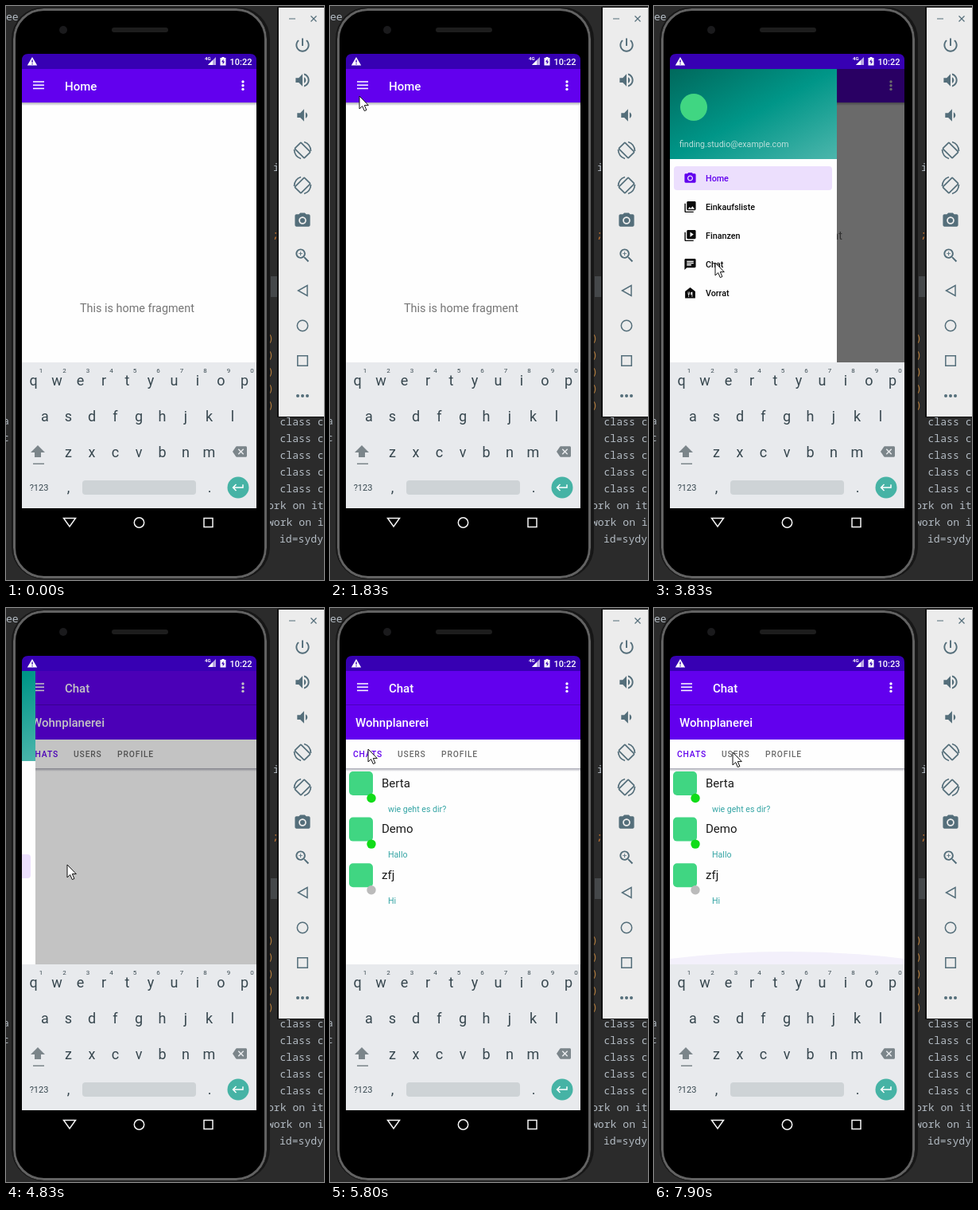
Write an HTML page that moves like this. It is 400x720 px and loops after 8000 ms.

```html
<!DOCTYPE html>
<html lang="de">
<head>
<meta charset="utf-8">
<title>Phone emulator</title>
<style>
html, body { margin: 0; width: 100%; height: 100%; overflow: hidden; background: #2b2b2b; }
svg { display: block; width: 400px; height: 720px; }
text { font-family: Roboto, sans-serif; white-space: pre; }
.code text { font: 13.1px "Noto Sans Mono", monospace; fill: #b4bcc4; }
.keys { text-anchor: middle; fill: #37474f; font-size: 18px; }
.med text, .med { font-weight: 500; }
</style>
</head>
<body>
<svg id="stage" viewBox="0 0 400 720">
  <defs>
    <linearGradient id="head" x1="0" y1="0" x2="1" y2="1">
      <stop offset="0" stop-color="#00695c"/><stop offset=".5" stop-color="#009688"/><stop offset="1" stop-color="#4db6ac"/>
    </linearGradient>
    <linearGradient id="shade" x2="0" y2="1">
      <stop offset="0" stop-color="#55556c" stop-opacity=".5"/><stop offset="1" stop-color="#55556c" stop-opacity="0"/>
    </linearGradient>
    <clipPath id="view"><path d="M20 79h295v368H20z"/></clipPath>
  </defs>

  <rect width="400" height="720" fill="#2b2b2b"/>
  <g class="code" id="code"></g>

  <!-- phone body -->
  <rect x="7" y="1.500" width="325" height="717" rx="40" fill="#161616"/>
  <rect x="10.500" y="4.500" width="316" height="712" rx="37" fill="#000" stroke="#626262" stroke-width="3"/>
  <rect x="8.500" y="2.500" width="320" height="716" rx="39" fill="none" stroke="#1c1c1c"/>
  <circle cx="72" cy="30" r="5" fill="#1a1a1c"/>
  <rect x="133" y="27" width="71" height="6" rx="3" fill="#1d1d1d"/>

  <!-- screen -->
  <rect x="20" y="79" width="295" height="551" fill="#fefefe"/>
  <path d="M20 79V68q0-8 8-8h279q8 0 8 8v11z" fill="#3700b3"/>
  <g fill="#fff">
    <path fill-rule="evenodd" d="M33 64l6.200 10.500H26.800zM32.400 67.500v3.500h1.300v-3.500zM32.400 72v1.300h1.300V72z"/>
    <text x="250" y="68" font-size="6" font-weight="700">4G</text>
    <path d="M264 64v10h-10z" opacity=".65"/>
    <path d="M260 68v6h-6z"/>
    <path fill-rule="evenodd" d="M271.500 64h3v1h2v9.500h-7V65h2zM273.500 66.500l-2.500 3.800h1.700v3l2.500-3.900h-1.700z"/>
    <text class="med" id="clock" x="281.500" y="73.500" font-size="11"></text>
  </g>

  <g clip-path="url(#view)">
    <rect x="20" y="79" width="295" height="42" fill="#6200ee"/>
    <path d="M34 95h14M34 99.300h14M34 103.600h14" stroke="#fff" stroke-width="1.500"/>
    <g fill="#fff"><circle cx="298" cy="95" r="1.700"/><circle cx="298" cy="99.700" r="1.700"/><circle cx="298" cy="104.400" r="1.700"/></g>
    <text class="med" id="title" x="74" y="105.500" font-size="15" fill="#fff"></text>

    <g id="home">
      <rect x="20" y="121" width="295" height="4" fill="url(#shade)"/>
      <text id="note" x="93" font-size="14.400" fill="#757575">This is home fragment</text>
    </g>

    <g id="chat">
      <rect x="20" y="121" width="295" height="44" fill="#6200ee"/>
      <path d="M20 121.500h295" stroke="#4c00bd"/>
      <rect x="20" y="201" width="295" height="4" fill="url(#shade)"/>
      <g class="med">
        <text x="32" y="149" font-size="15" fill="#fff">Wohnplanerei</text>
        <g font-size="10.300" letter-spacing=".85" fill="#6b6b6b">
          <text x="29" y="187" fill="#6200ee">CHATS</text>
          <text x="85" y="187">USERS</text>
          <text x="140" y="187">PROFILE</text>
        </g>
      </g>
      <g id="list"></g>
      <path id="glow" d="M20 440Q167 422 315 440V447H20z" fill="#f3f0fb"/>
    </g>

    <rect id="scrim" x="20" y="79" width="295" height="368"/>
    <g id="drawer">
      <rect x="20" y="79" width="210" height="368" fill="#fefefe"/>
      <rect x="20" y="79" width="210" height="113" fill="url(#head)"/>
      <circle cx="50" cy="127" r="17" fill="#40d682"/>
      <text x="32" y="177" font-size="10.600" fill="#b9dfda">finding.studio@example.com</text>
      <rect id="mark" x="25" width="199" height="30" rx="4" fill="#ecdffd"/>
      <g id="menu" class="med" font-size="10.750"></g>
    </g>
  </g>

  <!-- keyboard -->
  <rect x="20" y="447" width="295" height="183" fill="#e8eaed"/>
  <g class="keys" id="keys">
    <rect x="96" y="595" width="143" height="18" rx="4" fill="#ced3d6"/>
    <path d="M40 551l9 9h-5v6h-8v-6h-5zM34 573.500h14v1.500H34z" fill="#7b858a"/>
    <text x="41.500" y="608" font-size="11">?123</text>
    <text x="78.500" y="610">,</text>
    <text x="256" y="610">.</text>
    <circle cx="292" cy="604" r="13.500" fill="#46b3a5"/>
  </g>

  <g fill="none" stroke="#f5f5f5" stroke-width="1.500">
    <path d="M72.500 642.500h15L80 653z"/><circle cx="167.500" cy="648" r="6.200"/><path d="M249 642.500h11v11h-11z"/>
  </g>

  <!-- emulator controls -->
  <rect x="341" y="1" width="60" height="515" fill="#101010"/>
  <rect x="343" y="2" width="58" height="513" fill="#ececec"/>
  <g id="tools" fill="#546e7a">
    <g fill="none" stroke="#546e7a" stroke-width="1.500">
      <path d="M356 16h8M383.500 12.500l7 7M390.500 12.500l-7 7" stroke-width="1.200"/>
      <path d="M379 350.500v13l-11.500-6.500z"/><circle cx="373" cy="401" r="6.700"/><path d="M366.800 438.800h12.500v12.500h-12.500z"/>
    </g>
    <circle cx="367" cy="489" r="2"/><circle cx="373" cy="489" r="2"/><circle cx="379" cy="489" r="2"/>
    <g id="turn" fill="none" stroke="#546e7a" stroke-width="1.700">
      <rect x="-5.500" y="-8.500" width="11" height="17" rx="1" transform="rotate(-45)"/>
      <path d="M2-10.500Q10-8 10.500 1M-2 10.500Q-10 8-10.500-1"/>
    </g>
  </g>

  <path id="cursor" d="M0 0v16l3.700-3.400 2.600 6 2.600-1.100-2.600-5.900h5z" fill="#fff" stroke="#111"/>
</svg>
<script>
const $ = id => document.getElementById(id);
const add = (id, markup) => $(id).insertAdjacentHTML('beforeend', markup);

// 24-unit icon paths
const icons = {
  power: 'M13 3h-2v10h2V3zm4.83 2.17l-1.42 1.42C17.99 7.86 19 9.81 19 12c0 3.87-3.13 7-7 7s-7-3.13-7-7c0-2.19 1.01-4.14 2.58-5.42L6.17 5.17C4.23 6.82 3 9.26 3 12c0 4.97 4.03 9 9 9s9-4.03 9-9c0-2.74-1.23-5.18-3.17-6.83z',
  loud: 'M3 9v6h4l5 5V4L7 9H3zm13.5 3c0-1.77-1.02-3.29-2.5-4.03v8.05c1.48-.73 2.5-2.25 2.5-4.02zM14 3.23v2.06c2.89.86 5 3.54 5 6.71s-2.11 5.85-5 6.71v2.06c4.01-.91 7-4.49 7-8.77s-2.99-7.86-7-8.77z',
  quiet: 'M18.5 12c0-1.77-1.02-3.29-2.5-4.03v8.05c1.48-.73 2.5-2.25 2.5-4.02zM5 9v6h4l5 5V4L9 9H5z',
  camera: 'M9 2L7.17 4H4c-1.1 0-2 .9-2 2v12c0 1.1.9 2 2 2h16c1.1 0 2-.9 2-2V6c0-1.1-.9-2-2-2h-3.17L15 2H9zm3 15c-2.76 0-5-2.24-5-5s2.24-5 5-5 5 2.24 5 5-2.24 5-5 5zm0-8.2a3.2 3.2 0 1 0 0 6.4 3.2 3.2 0 0 0 0-6.4z',
  zoom: 'M15.5 14h-.79l-.28-.27C15.41 12.59 16 11.11 16 9.5 16 5.91 13.09 3 9.5 3S3 5.91 3 9.5 5.91 16 9.5 16c1.61 0 3.09-.59 4.23-1.57l.27.28v.79l5 4.99L20.49 19l-4.99-5zm-6 0C7.01 14 5 11.99 5 9.5S7.01 5 9.5 5 14 7.01 14 9.5 11.99 14 9.5 14zM12 10h-2v2H9v-2H7V9h2V7h1v2h2v1z',
  photos: 'M22 16V4c0-1.1-.9-2-2-2H8c-1.1 0-2 .9-2 2v12c0 1.1.9 2 2 2h12c1.1 0 2-.9 2-2zm-11-4l2.03 2.71L16 11l4 5H8l3-4zM2 6v14c0 1.1.9 2 2 2h14v-2H4V6H2z',
  video: 'M4 6H2v14c0 1.1.9 2 2 2h14v-2H4V6zm16-4H8c-1.1 0-2 .9-2 2v12c0 1.1.9 2 2 2h12c1.1 0 2-.9 2-2V4c0-1.1-.9-2-2-2zm-8 12.5v-9l6 4.5-6 4.5z',
  bubble: 'M20 2H4c-1.1 0-2 .9-2 2v18l4-4h14c1.1 0 2-.9 2-2V4c0-1.1-.9-2-2-2zM6 9h12v2H6V9zm8 5H6v-2h8v2zm4-6H6V6h12v2z',
  pantry: 'M12 2L3 9v12h18V9zM8 10h1v3h1v-3h1v4l-1 1v4H9v-4l-1-1zM13 11l3-1v9h-1v-4h-2z',
  erase: 'M22 3H7c-.69 0-1.23.35-1.59.88L0 12l5.41 8.11c.36.53.9.89 1.59.89h15c1.1 0 2-.9 2-2V5c0-1.1-.9-2-2-2zm-3 12.59L17.59 17 14 13.41 10.41 17 9 15.59 12.59 12 9 8.41 10.41 7 14 10.59 17.59 7 19 8.41 15.41 12 19 15.59z',
  enter: 'M19 7v4H5.83l3.58-3.59L8 6l-6 6 6 6 1.41-1.41L5.83 13H21V7z'
};
const icon = (name, x, y, size, fill = '') =>
  `<path fill-rule="evenodd" ${fill && `fill="${fill}"`} d="${icons[name]}" transform="translate(${x - size / 2} ${y - size / 2}) scale(${size / 24})"/>`;

// code behind the phone
const line = (x, y, text, fill = '') => add('code', `<text x="${x}" y="${y}" ${fill && `style="fill:${fill}"`}>${text}</text>`);
for (let i = 0; i < 5; i++) line(344.5, 526 + 21 * i, 'class c');
line(329, 631, 'ork on it');
line(329, 652, 'work on i');
line(344, 673, 'id=sydy');
line(0, 18, 'ee');
line(-4, 525, 'a');
line(-4, 546, 'c');
line(336, 207, 'i');
line(335, 291, ';', '#cc7832');
for (let i = 0; i < 5; i++) line(329, 421 + 21 * i, ')', '#b07a3c');
add('code', '<rect x="333" y="339" width="9" height="26" fill="#45484a"/>');

// keyboard letters
[['qwertyuiop', 34.5, 476], ['asdfghjkl', 49, 521], ['zxcvbnm', 78.5, 566]].forEach(([row, x, y], r) =>
  [...row].forEach((key, i) => {
    add('keys', `<text x="${x + 29.5 * i}" y="${y}">${key}</text>`);
    if (!r) add('keys', `<text x="${44 + 29.5 * i}" y="459.5" font-size="8">${(i + 1) % 10}</text>`);
  }));
add('keys', icon('erase', 294, 559, 18, '#7b858a') + icon('enter', 292, 604, 18, '#fff'));

['power', 'loud', 'quiet', '', '', 'camera', 'zoom'].forEach((name, i) => {
  if (name) add('tools', icon(name, 373, 49 + 44 * i, 23));
});
$('turn').setAttribute('transform', 'translate(373 181)');
add('tools', '<use href="#turn" transform="translate(746 44) scale(-1 1)"/>');

[['Home', 'camera'], ['Einkaufsliste', 'photos'], ['Finanzen', 'video'], ['Chat', 'bubble'], ['Vorrat', 'pantry']].forEach(([label, name], i) => {
  const y = 216 + 36 * i;
  add('menu', `<g fill="${i ? '#0a0a0a' : '#6200ee'}">${icon(name, 45.5, y, 17)}<text x="65" y="${y + 4}">${label}</text></g>`);
});

[['Berta', 'wie geht es dir?', '#10dc18'], ['Demo', 'Hallo', '#10dc18'], ['zfj', 'Hi', '#bbb']].forEach(([name, message, dot], i) =>
  add('list', `<g transform="translate(0 ${57.6 * i})">
    <rect x="24" y="205" width="30" height="30" rx="5" fill="#40d682"/>
    <circle cx="52" cy="238.500" r="5.700" fill="${dot}"/>
    <text x="65" y="224.500" font-size="15" fill="#1a1a1a">${name}</text>
    <text x="73" y="255.500" font-size="10.600" fill="#35a5a5">${message}</text></g>`));

// cursor stops: time, x, y
const path = [
  [530, -6, 52], [850, 97, 136], [1330, 35, 103], [1370, 33, 98], [1770, 33, 98], [1830, 37, 113],
  [3199, 37, 113], [3200, 66, 200], [3369, 66, 200], [3370, 77, 322], [5400, 77, 322], [5800, 48, 177],
  [6130, 48, 177], [6450, 112, 250], [6670, 101, 273], [7799, 101, 273], [7800, 100, 222],
  [7899, 100, 222], [7900, 99, 181], [8000, 99, 181]
];
const show = (id, on) => { $(id).style.display = on ? '' : 'none'; };

function moveCursor(t) {
  const i = path.findIndex(stop => stop[0] > t);
  show('cursor', i > 0);
  if (i < 1) return;
  const [t0, x0, y0] = path[i - 1], [t1, x1, y1] = path[i], k = (t - t0) / (t1 - t0);
  $('cursor').setAttribute('transform', `translate(${x0 + (x1 - x0) * k} ${y0 + (y1 - y0) * k})`);
}

function draw(t) {
  const chat = t >= 4830, open = t >= 2970 && t < 5170;
  $('clock').textContent = t < 7800 ? '10:22' : '10:23';
  $('title').textContent = chat ? 'Chat' : 'Home';
  show('home', !chat);
  show('chat', chat);
  show('list', t >= 5400);
  show('glow', t >= 7800);
  show('scrim', open);
  show('drawer', open);
  $('note').setAttribute('y', t < 2970 ? 384 : 293);
  $('scrim').setAttribute('opacity', chat ? .23 : .58);
  $('drawer').setAttribute('transform', `translate(${chat ? -193 : 0} 0)`);
  $('mark').setAttribute('y', chat ? 309 : 201);
  moveCursor(t);
}

const start = performance.now();
function tick() {
  draw((performance.now() - start) % 8000);
  requestAnimationFrame(tick);
}
tick();
</script>
</body>
</html>
```
